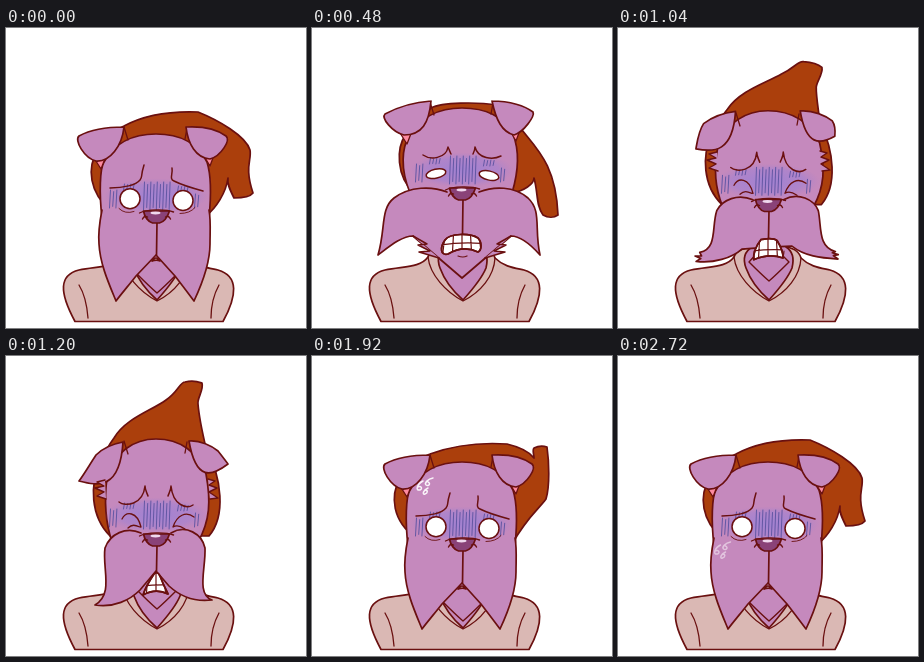
These frames come from a looping animation (300 by 300 pixels, 2800 ms). An HTML page with a canvas:

```html
<!DOCTYPE html>
<html lang="en">
<head>
<meta charset="utf-8">
<title>Worried dog</title>
<style>
html, body { margin: 0; width: 100%; height: 100%; overflow: hidden; background: #fff; }
canvas { display: block; width: 100vw; height: 100vh; }
</style>
</head>
<body>
<canvas id="stage" width="300" height="300"></canvas>
<script>
const ctx = document.getElementById('stage').getContext('2d');
const LOOP = 2800, STEP = 80;
const INK = '#6a1010', SKIN = '#c589bd', HAT = '#ab3f0c', CLOTH = '#dab8b4', PINK = '#fd8aa0';

// Poses: rest, wince, bristle, puff, alert, settle
const faceKeys = [[0, 'rest'], [480, 'wince'], [600, 'bristle'], [880, 'bristle'], [1120, 'puff'],
  [1260, 'puff'], [1480, 'alert'], [1720, 'alert'], [1900, 'rest'], [LOOP, 'rest']];
const hatKeys = [[0, 'rest'], [480, 'wince'], [560, 'wince'], [800, 'bristle'], [1120, 'puff'],
  [1220, 'puff'], [1480, 'alert'], [1760, 'alert'], [1920, 'settle'], [2240, 'rest'], [LOOP, 'rest']];

// One tip that can open into a ragged one
const tip = (x, y) => ` L${x} ${y}`.repeat(4);

const hat = {
  rest: 'M104 182C84 165 80 140 92 122C98 110 108 102 118 98C140 86 165 83 192 84C212 92 240 108 244 122C246 132 238 138 247 165C244 169 234 170 228 170C223 160 221 155 222 150C220 165 210 180 200 188Z',
  wince: 'M102 165C84 148 84 120 94 106C100 94 108 88 119 80C130 74 165 74 186 77C196 84 204 94 210 102C226 122 244 138 246 187C242 190 236 190 231 187C224 178 226 164 222 150C222 156 212 163 200 165Z',
  bristle: 'M104 158C86 145 84 118 92 106C100 92 108 84 118 76C135 65 160 57 182 57C204 60 215 66 222 75C230 90 238 90 247 106C244 110 240 114 232 119C225 112 223 104 212 107C218 128 216 145 206 158Z',
  puff: 'M104 180C84 160 84 128 94 108C98 98 102 90 108 82C120 62 145 55 160 44C172 36 174 26 179 26C188 24 193 26 196 27C198 34 191 42 192 48C193 60 196 75 200 92C216 122 220 160 203 180Z',
  alert: 'M108 178C86 154 82 126 92 108C97 95 96 92 99 82C112 62 140 40 158 26C170 15 172 5 178 4C188 2 193 4 196 5C198 14 190 28 191 38C193 52 196 65 199 79C220 108 220 148 202 170Z',
  settle: 'M104 182C80 165 78 140 88 122C96 110 106 102 118 98C140 90 165 86 195 88C212 92 219 98 222 102C222 98 220 94 222 92C228 89 232 90 235 91C237 105 238 130 234 143C226 154 216 160 200 188Z'
};
const head = {
  rest: 'M96 190C93 165 94 140 98 134C108 116 125 106 150 106C175 106 192 116 201 134C206 150 205 170 203 190',
  wince: 'M98 165C88 140 90 120 97 108C108 90 125 80 150 80C175 80 192 90 201 106C208 124 206 145 200 165',
  bristle: 'M101 158C89 140 89 122 97 108C108 90 128 82 150 82C174 82 195 90 206 106C214 124 214 142 205 158',
  puff: 'M106 186C99 165 98 145 101 122C108 96 128 83 150 83C174 83 192 96 200 118C205 145 204 165 192 186',
  alert: 'M108 188C97 160 95 130 98 112C110 93 130 84 150 84C174 84 192 93 201 112C205 130 204 160 190 188'
};
const muzzle = {
  rest: `M96 182C94 192 92 204 93 216C94 236 103 256 110 273${tip(110, 273)}C116 265 123 257 130 248L150 227L169 248C176 257 182 265 188 273${tip(188, 273)}C196 256 204 236 204 216C204 204 205 192 203 182`,
  wince: `M135 164C120 158 98 158 82 170C68 181 74 200 66 227${tip(66, 227)}C78 218 90 208 101 208L150 250L199 208C210 208 220 218 228 227${tip(228, 227)}C222 200 230 183 216 170C202 158 182 158 167 164`,
  bristle: 'M135 157C120 152 106 153 98 156C86 161 76 172 61 154L68 168L43 168L65 178L47 189C60 189 84 190 95 184L150 231L205 184C216 188 238 184 260 194L242 181L261 177L238 170L250 165C228 166 214 160 204 156C196 153 182 152 167 157',
  puff: `M135 177C120 170 104 178 99 192C96 212 108 238 89 249${tip(89, 249)}C108 252 124 244 134 234L150 215L163 230C176 242 190 246 206 244${tip(206, 244)}C190 238 200 212 199 192C196 178 180 168 165 177`,
  alert: `M128 179C116 182 102 200 100 212C97 228 103 244 109 259${tip(109, 259)}C117 250 126 241 134 232L150 216L163 230C172 240 182 250 191 258${tip(191, 258)}C197 240 200 224 198 208C195 196 184 184 172 180`
};
const earLeft = {
  rest: 'M118 99C100 99 84 102 73 108C68 112 78 130 90 133C104 134 116 118 118 99',
  wince: 'M119 73C104 74 86 79 73 86C69 90 80 104 92 107C110 107 117 95 119 73',
  bristle: 'M119 76C104 76 86 80 73 86C70 91 80 104 92 109C108 109 117 97 119 76',
  puff: 'M117 86C106 88 96 93 90 99C84 108 79 117 73 125C92 130 114 134 117 86',
  alert: 'M120 91C110 82 98 74 88 70C84 67 80 64 76 66C80 84 90 104 101 120'
};
const earRight = {
  rest: 'M180 99C198 98 212 102 220 108C225 112 215 128 204 131C190 130 182 116 180 99',
  wince: 'M180 73C198 73 213 78 221 84C223 88 212 104 202 107C190 104 184 92 180 73',
  bristle: 'M180 77C198 76 213 81 221 87C222 91 212 106 202 109C190 107 182 95 180 77',
  puff: 'M183 85C194 84 206 90 212 95C216 100 219 104 222 108C206 120 190 126 183 85',
  alert: 'M181 90C190 80 202 70 210 63C213 62 216 62 217 66C219 84 213 104 205 119'
};
const brows = {
  rest: 'M104 160C118 160 130 157 134 152C137 148 134 150 138 137M197 163C186 160 174 156 168 153C163 151 167 146 166 140',
  wince: 'M111 127C118 132 134 131 136 119C137 121 138 124 139 126M189 128C181 132 166 131 163 119C163 122 162 124 161 126',
  bristle: 'M112 121C118 127 136 128 138 108C138 112 140 115 141 118M190 120C183 126 168 125 166 107C167 111 164 115 163 117',
  puff: 'M113 146C119 151 137 149 139 130C139 134 141 137 142 140M187 149C181 153 167 150 165 130C165 134 163 137 162 140',
  alert: 'M112 138C118 144 137 142 137 123C137 127 139 131 140 134M189 143C181 146 163 144 163 121C164 126 162 130 161 133'
};
const mouth = {
  rest: 'M146 233C148 229 152 229 154 233C154 233 154 233 154 233C152 232 149 232 146 233C146 233 146 233 146 233',
  wince: 'M133 212C138 205 158 205 166 210C170 214 170 222 166 224C156 219 146 220 136 226C128 228 128 219 133 212',
  bristle: 'M129 193C142 196 164 190 174 192C182 196 180 206 174 207C160 206 146 208 132 211C122 211 122 199 129 193',
  puff: 'M148 218C150 216 152 216 154 220C157 228 160 234 162 238C154 234 146 234 137 239C140 230 144 224 148 218',
  alert: 'M149 219C152 224 158 230 161 238C162 242 159 244 157 243C151 239 145 239 140 243C134 243 138 231 149 219'
};
// nose y, shade y, end of lip line, eye y, eye height, mouth y, eye tilt, dark mouth corners
const levels = {
  rest: '183 168 227 171.5 10 232 0 30',
  wince: '160 142 206 146.5 4.5 215 .22 30',
  bristle: '153 137 194 142 0 201 .22 26',
  puff: '178 159 215 164 0 229 .22 20',
  alert: '177 152 217 157 0 234 .22 12'
};

const NUMBER = /-?\d*\.?\d+/g;
function mix(a, b, t) {
  const goals = b.match(NUMBER);
  let i = 0;
  return a.replace(NUMBER, n => (+n + (goals[i++] - n) * t).toFixed(2));
}

function poseAt(keys, time) {
  const i = keys.findIndex((k, n) => time < keys[n + 1][0]);
  const [start, from] = keys[i], [end, to] = keys[i + 1];
  const u = (time - start) / (end - start), t = u * u * (3 - 2 * u);
  return {
    shape: part => mix(part[from], part[to], t),
    weight: name => (from === name ? 1 - t : 0) + (to === name ? t : 0)
  };
}

function draw(path, fill, stroke = INK, width = 1.7) {
  const p = new Path2D(path);
  if (fill) { ctx.fillStyle = fill; ctx.fill(p); }
  if (stroke) { ctx.strokeStyle = stroke; ctx.lineWidth = width; ctx.stroke(p); }
}

function oval(x, y, rx, ry, tilt, fill, stroke) {
  ctx.beginPath();
  ctx.ellipse(x, y, rx, ry, tilt, 0, Math.PI * 2);
  ctx.fillStyle = fill;
  ctx.fill();
  if (stroke) { ctx.strokeStyle = stroke; ctx.lineWidth = 1.5; ctx.stroke(); }
}

function at(x, y, paint) {
  ctx.save();
  ctx.translate(x, y);
  paint();
  ctx.restore();
}

function drawBody() {
  draw('M69 293.5C53 264 53 247 73 242C92 238 108 240 116 229C118 222 128 219 136 219L166 219C174 219 181 223 183 230C192 239 203 240 212 242C233 248 231 268 217 293.5Z', CLOTH);
  draw('M134 219C126 224 125 232 128 240C133 254 142 264 151 272C160 262 170 250 174 240C176 232 176 224 168 219', SKIN);
  draw('M116 229C118 247 134 264 151 273C169 264 182 248 183 230M82 290C81 277 78 265 73 257M205 290C205 278 208 266 213 257', null, INK, 1.3);
  draw('M136 223C136 228 138 232 140 236M166 223C166 228 164 232 162 236', null, INK, 1.1);
}

function drawShade(y) {
  at(150, y, () => {
    ctx.scale(1, 0.34);
    const glow = ctx.createRadialGradient(0, 0, 8, 0, 0, 52);
    glow.addColorStop(0, 'rgba(146,126,218,.65)');
    glow.addColorStop(0.65, 'rgba(155,128,214,.5)');
    glow.addColorStop(1, 'rgba(170,130,200,0)');
    oval(0, 0, 52, 52, 0, glow);
  });
  const groups = [[138, 9, 0, 14], [104, 3, 3, 9], [118, 4, -9, 3], [172, 4, -7, 3], [189, 2, 5, 7]];
  let lines = '';
  for (const [x, count, dy, half] of groups) {
    for (let i = 0; i < count; i++) {
      const reach = half * (1 - 0.18 * (i % 2)), px = x + i * 3.2;
      lines += `M${px + 0.5} ${y + dy - reach}L${px - 0.5} ${y + dy + reach}`;
    }
  }
  draw(lines, null, '#6357a4', 1);
}

function drawEyes(y, height, tilt, shake) {
  if (height < 2) {
    at(150, y, () => draw('M-34 -1C-30 -9 -19 -9 -15 7M17 7C21 -5 30 -9 38 -3M-28 8C-24 4 -21 5 -16 7M17 7C22 4 26 7 29 9', null, INK, 1.3));
    return;
  }
  oval(124 + shake, y - 0.8, 10, height, -tilt, '#fff', INK);
  oval(177 + shake, y + 1, 10, height, tilt, '#fff', INK);
  if (height > 8) draw(`M113 ${y + 9}Q119 ${y + 15} 128 ${y + 12}M174 ${y + 14}Q184 ${y + 14} 189 ${y + 8}`, null, INK, 0.9);
}

function drawNose(y) {
  at(150.5, y, () => {
    draw('M-13 0L13 0C11 6 7 11 3 12L-4 12C-8 11 -12 6 -13 0Z', '#8a4278');
    draw('M-17 2C-10 -2 10 -2 17 1M-14 8Q-12 4 -9 6M14 8Q12 4 9 6', null, INK, 1.4);
    oval(-1, 2, 5, 1.4, 0, '#f0d8ee');
  });
}

function drawMouth(path, y, corners, open) {
  draw(path, '#fff');
  if (!open) return;
  ctx.save();
  ctx.clip(new Path2D(path));
  let teeth = `M118 ${y + 4}Q150 ${y - 3} 184 ${y + 2}`;
  for (let x = -27; x < 30; x += 9) teeth += `M${150 + x * 0.9} ${y - 16}L${150 + x * 1.1} ${y + 16}`;
  draw(teeth, null, INK, 1.2);
  for (const side of [-1, 1]) oval(150.5 + side * corners, y + 3, 5, 6, 0, '#160505');
  ctx.restore();
  draw(path);
}

function drawSweat(time) {
  if (time < 1840) return;
  const u = (time - 1920) / 800;
  ctx.globalAlpha = 0.9 - 0.4 * Math.max(0, u);
  at(113 - 8.5 * u, 130 + 64 * u, () => {
    draw('M-2 -5C-8 -2 -10 5 -5 4C-2 3 -4 -1 -7 1M8 -8C3 -7 -1 -3 1 -1C4 1 6 -3 3 -4M3 2C-2 4 -3 9 0 8C3 7 3 4 0 4', null, '#fff', 1.5);
  });
  ctx.globalAlpha = 1;
}

function render(time) {
  const face = poseAt(faceKeys, time), cap = poseAt(hatKeys, time);
  const [noseY, shadeY, lipY, eyeY, eyeHeight, mouthY, tilt, corners] = face.shape(levels).split(' ').map(Number);
  const alert = face.weight('alert'), up = alert > 0.5;
  const wince = face.weight('wince') > 0.6, puff = face.weight('puff') > 0.6;

  ctx.fillStyle = '#fff';
  ctx.fillRect(0, 0, 300, 300);
  ctx.lineJoin = ctx.lineCap = 'round';
  drawBody();
  draw(cap.shape(hat), HAT);
  if (up) oval(147, 93, 37, 18 * alert, 0, '#000', INK);
  draw(face.shape(head), SKIN);

  if (!up) {
    const drop = noseY < 172 ? -25 : 0;
    if (!puff) at(0, drop, () => draw('M88 130L95 141L100 128ZM198 128L204 138L208 127Z', PINK, INK, 1.3));
    at(0, puff ? -14 : drop, () => draw('M118 99L122 112M181 100L179 111', null, INK, 1.3));
  }
  draw(face.shape(earLeft), SKIN);
  draw(face.shape(earRight), SKIN);
  if (up) {
    draw('M84 80C96 84 110 94 116 108L101 118C94 106 88 94 84 80ZM213 65C203 76 193 90 189 104L204 117C210 102 213 86 213 65Z', PINK, INK, 1.3);
    draw('M78 76L75 58L81 67L83 57L87 69L90 63L92 71L97 67L97 75M205 68L208 58L211 65L212 52L215 63L218 48L217 70', SKIN, INK, 1.5);
  }
  if (puff) draw('M99 124L91 126L98 130L89 132L98 136L91 140L100 143M202 123L209 125L203 129L211 132L203 136L212 142L204 143', SKIN, INK, 1.4);

  const chin = face.weight('wince') + face.weight('bristle') < 0.5;
  if (chin) at(0, up || puff ? -12 : 0, () => draw('M131 246C137 252 144 259 151 265C158 259 165 252 171 246L150 225Z', SKIN, INK, 1.4));
  draw(face.shape(muzzle), SKIN);
  if (wince) draw('M101 208L115 216L106 217L118 223L107 224L127 230M199 208L185 216L194 217L182 223L193 224L173 230', SKIN, INK, 1.5);
  drawShade(shadeY);
  draw(face.shape(brows), null, INK, 1.5);
  drawEyes(eyeY, eyeHeight, tilt, time > 2300 ? 0.5 * Math.sin(time / 51) : 0);
  draw(`M151 ${noseY + 11}L150.5 ${lipY}`, null);
  drawMouth(face.shape(mouth), mouthY, corners, face.weight('rest') < 0.7);
  if (!chin) draw(`M146 ${mouthY + 13}Q151 ${mouthY + 15} 155 ${mouthY + 13}`, null, INK, 1.2);
  drawNose(noseY);
  drawSweat(time);
}

function tick(now) {
  render(Math.floor((now % LOOP) / STEP) * STEP);
  requestAnimationFrame(tick);
}
render(0);
requestAnimationFrame(tick);
</script>
</body>
</html>
```
